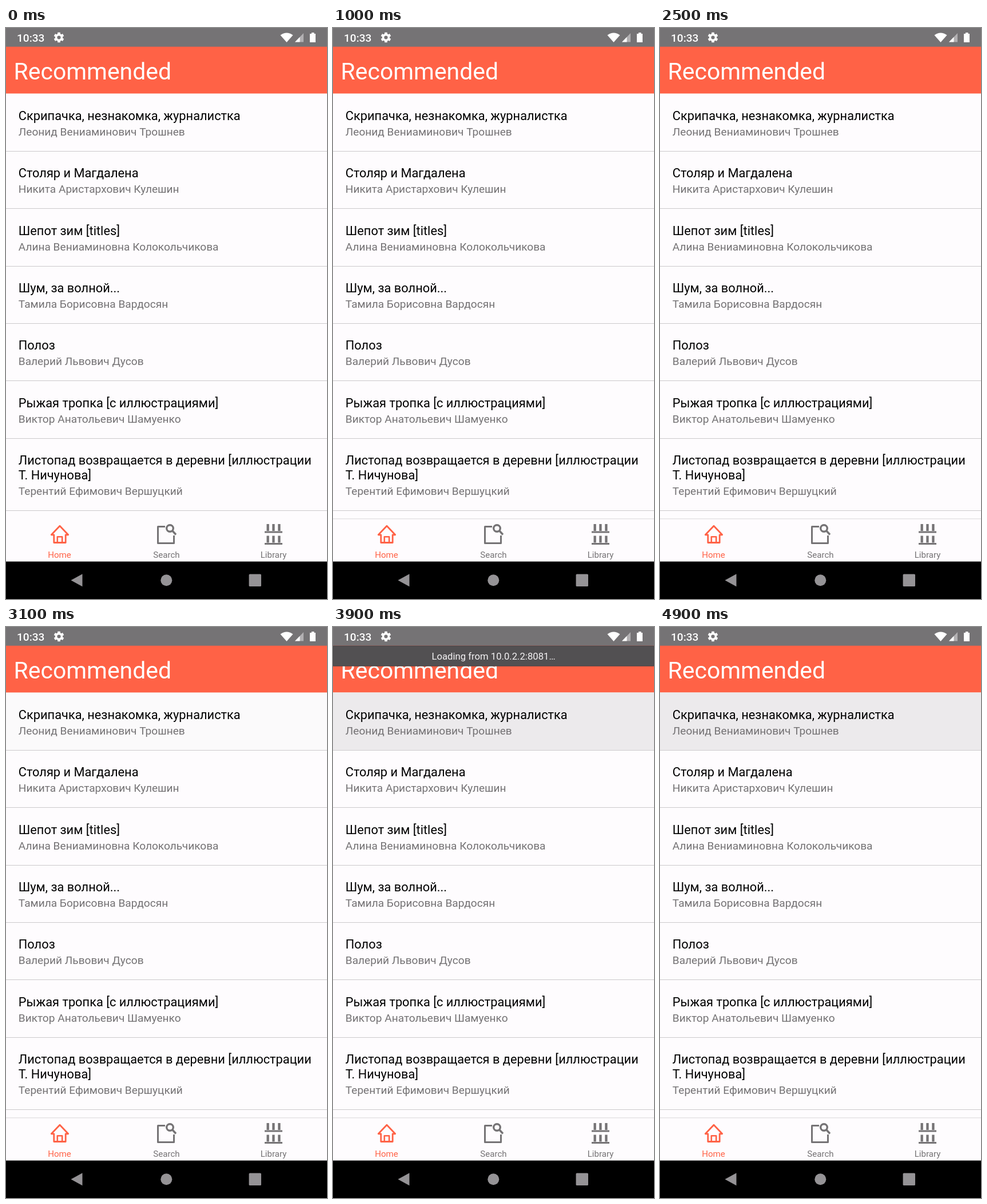
Animation of 561 by 998 pixels, one loop 5 s. Source, as an HTML page with a canvas:

```html
<!DOCTYPE html>
<html lang="ru">
<head>
<meta charset="utf-8">
<title>Recommended</title>
<style>
html, body { margin: 0; width: 100%; height: 100%; overflow: hidden; background: #000; }
canvas { display: block; }
</style>
</head>
<body>
<canvas id="stage" width="561" height="998"></canvas>
<script>
const ctx = document.getElementById('stage').getContext('2d');
const W = 561, H = 998, LOOP = 5000;
const TOMATO = '#ff6246', PAPER = '#fefcfe', GRAY = '#757375', NAV = '#959396';
const HEADER_TOP = 32.7, LIST_TOP = 114.5, TAB_TOP = 857, NAV_TOP = 932.5;
const ROW = 100.35, LINE = 25.6, PAD = 21.8;

const books = [
  { title: ['Скрипачка, незнакомка, журналистка'], author: 'Леонид Вениаминович Трошнев' },
  { title: ['Столяр и Магдалена'], author: 'Никита Аристархович Кулешин' },
  { title: ['Шепот зим [titles]'], author: 'Алина Вениаминовна Колокольчикова' },
  { title: ['Шум, за волной...'], author: 'Тамила Борисовна Вардосян' },
  { title: ['Полоз'], author: 'Валерий Львович Дусов' },
  { title: ['Рыжая тропка [с иллюстрациями]'], author: 'Виктор Анатольевич Шамуенко' },
  { title: ['Листопад возвращается в деревни [иллюстрации', 'Т. Ничунова]'],
    author: 'Терентий Ефимович Вершуцкий' }
];

function rect(x, y, w, h, color) {
  ctx.fillStyle = color;
  ctx.fillRect(x, y, w, h);
}

function text(str, x, y, size, color, align = 'left', weight = 400) {
  ctx.font = `${weight} ${size}px Roboto, sans-serif`;
  ctx.textAlign = align;
  ctx.fillStyle = color;
  ctx.fillText(str, x, y);
}

function fillPath(d, color) {
  ctx.fillStyle = color;
  ctx.fill(new Path2D(d));
}

function strokePath(d, color, width = 3) {
  ctx.strokeStyle = color;
  ctx.lineWidth = width;
  ctx.stroke(new Path2D(d));
}

function disc(x, y, r, color) {
  ctx.fillStyle = color;
  ctx.beginPath();
  ctx.arc(x, y, r, 0, Math.PI * 2);
  ctx.fill();
}

function gear(x, y) {
  ctx.save();
  ctx.translate(x, y);
  for (let i = 0; i < 6; i++) {
    rect(-2.3, -8.8, 4.6, 5, '#fff');
    ctx.rotate(Math.PI / 3);
  }
  ctx.strokeStyle = '#fff';
  ctx.lineWidth = 3.6;
  ctx.beginPath();
  ctx.arc(0, 0, 4.9, 0, Math.PI * 2);
  ctx.stroke();
  ctx.restore();
}

function statusBar() {
  rect(0, 0, W, HEADER_TOP + 1, GRAY);
  text('10:33', 19, 24, 19.1, '#fff', 'left', 500);
  gear(92.5, 16.5);
  fillPath('M479.5 12.5Q490.5 4.5 501.5 12.5L490.5 25Z', '#fff');
  fillPath('M505 24.5L520 9V24.5Z', '#b2b0b2');
  fillPath('M505 24.5L513.5 15.8V24.5Z', '#fff');
  fillPath('M531 10H534V8H538.5V10H541V25H531Z', '#fff');
}

function header() {
  rect(0, HEADER_TOP, W, LIST_TOP - HEADER_TOP + 1, TOMATO);
  text('Recommended', 13.6, 90, 40.9, '#fff');
}

function list(press) {
  rect(0, LIST_TOP, W, TAB_TOP - LIST_TOP, PAPER);
  rect(0, LIST_TOP, W, ROW, `rgba(236,234,236,${press})`);
  let top = LIST_TOP + 0.5;
  for (const { title, author } of books) {
    const extra = (title.length - 1) * LINE;
    title.forEach((line, i) => text(line, PAD, Math.round(top + 46 + i * LINE), 21.8, '#000'));
    text(author, PAD, Math.round(top + 73 + extra), 19.1, '#747274');
    top += ROW + extra;
    rect(0, Math.floor(top), W, 1, '#cbc9cb');
  }
}

function homeIcon() {
  strokePath('M94 870.2L79.3 885.8H83.8V899.5H104.2V885.8H108.7Z', TOMATO, 2.8);
  strokePath('M89.8 899V889.2H98.2V899', TOMATO, 2.6);
}

function searchIcon() {
  strokePath('M278 871.5H265.5V900.5H293.5V887', GRAY);
  strokePath('M291 879L297 885.5', GRAY, 3.4);
  ctx.beginPath();
  ctx.arc(286.5, 874.5, 5.8, 0, Math.PI * 2);
  ctx.stroke();
}

function libraryIcon() {
  for (const y of [867, 887.5]) {
    rect(452, y + 12.5, 31, 3, GRAY);
    for (const x of [455.5, 465.3, 475.3]) rect(x, y, 4.3, 12, GRAY);
  }
}

function tabs(edge) {
  rect(0, TAB_TOP, W, NAV_TOP - TAB_TOP + 1, PAPER);
  if (edge) rect(0, TAB_TOP, W, 1.5, '#e6e4e6');
  ctx.lineJoin = 'round';
  homeIcon();
  searchIcon();
  libraryIcon();
  text('Home', 93.5, 926, 15.1, TOMATO, 'center');
  text('Search', 280.5, 926, 15.1, GRAY, 'center');
  text('Library', 467.5, 926, 15.1, GRAY, 'center');
}

function navBar() {
  rect(0, NAV_TOP, W, H - NAV_TOP, '#000');
  fillPath('M113.5 965.2L133.5 954.2V976.2Z', NAV);
  disc(280.3, 965.2, 10, NAV);
  ctx.beginPath();
  ctx.roundRect(424.6, 954.6, 21.4, 21.4, 1.5);
  ctx.fill();
}

function loadingBar() {
  rect(0, HEADER_TOP, W, 36, '#454345');
  rect(1, HEADER_TOP + 1, W - 2, 34, '#525052');
  text('Loading from 10.0.2.2:8081…', W / 2, 57, 16.7, '#f4f2f4', 'center');
}

function draw(now) {
  const t = Math.floor((now % LOOP) / 100) * 100;
  const press = Math.min(1, Math.max(0, (t - 3000) / 600));
  statusBar();
  header();
  list(press);
  tabs(t >= 500);
  navBar();
  if (t >= 3900 && t < 4000) loadingBar();
}

function tick() {
  draw(performance.now());
  requestAnimationFrame(tick);
}
tick();
</script>
</body>
</html>
```
